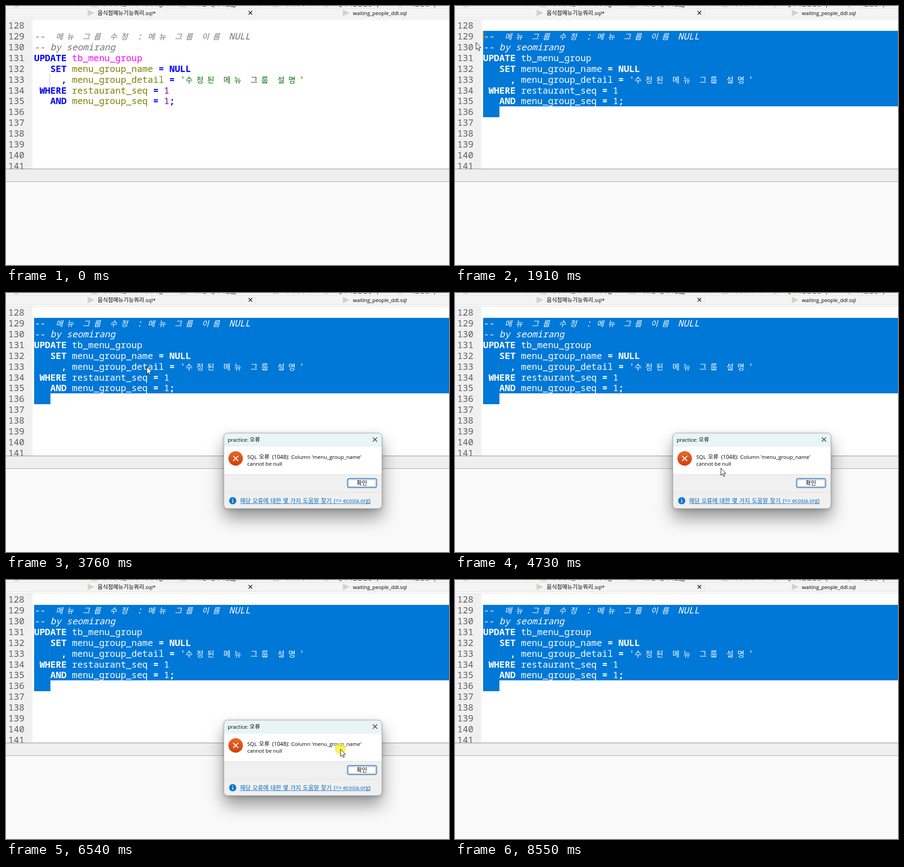
These frames come from a looping animation (977 by 573 pixels, 9.15 s). An HTML page:

```html
<!DOCTYPE html>
<html lang="ko">
<head>
<meta charset="utf-8">
<title>SQL editor</title>
<style>
  html, body { margin: 0; width: 100%; height: 100%; overflow: hidden; background: #fff; }
  svg { position: absolute; left: 0; top: 0; width: 977px; height: 573px; }
  text { font: 11.6px 'Open Sans', 'Noto Sans CJK KR', sans-serif; fill: #000; }
  .ko { font-size: 12.4px; }
  .code text { font: 19.88px 'Noto Sans Mono', 'Noto Sans CJK KR', monospace; }
  .code .hangul { font-size: 17px; }
  .code .note { fill: #747474; font-style: italic; }
  .code .key { fill: #00f; font-weight: bold; }
  .code .op { fill: #00f; font-weight: 600; }
  .code .table { fill: #f0f; }
  .code .name { fill: #808000; }
  .code .num { fill: #800080; }
  .code .str { fill: #006c00; }
  .code .line { fill: #606060; }
  #selection text { fill: #fff; }
  #dialog { transform-origin: 595px 358px; }
  #window { filter: drop-shadow(0 2px 5px rgba(0, 0, 0, .2)) drop-shadow(0 20px 18px rgba(0, 0, 0, .4)); }
  .link { fill: #0067c0; }
</style>
</head>
<body>
<svg>
  <rect width="977" height="573" fill="#fff"/>
  <rect y="30" width="60" height="331" fill="#f8f8f8"/>
  <rect y="30" width="57" height="331" fill="#f0f0f0"/>
  <g class="code" id="numbers"></g>
  <g class="code"></g>
  <path d="M96.5 151V174" stroke="#777" stroke-dasharray="1 1"/>

  <rect width="977" height="30" fill="#f4f4f4"/>
  <path d="M0 5.5H977M158.5 0V5M354.5 0V5M559.5 0V5M673.5 0V5M549.5 6V25M0 25.5H977" stroke="#e2e2e2"/>
  <rect y="26" width="977" height="3" fill="#f9f9f9"/>
  <path d="M0 29.5H977" stroke="#e6e6e6"/>
  <path d="M18 1h10M188 1h14M383 1h15M588 1h14M703 1h6M866 1h6" stroke="#d9d6d1" stroke-width="3"/>
  <text class="ko"><tspan x="210" y="0">대기테이블목록조회쿼리 g</tspan><tspan x="409">메뉴관리_테이블_g</tspan><tspan x="612">예약쿼리</tspan><tspan x="735">_대기인원현황 sp</tspan><tspan x="889">회원현황 sp</tspan></text>
  <path d="M180 8l15 7.3-15 7.3zM743 8l15 7.3-15 7.3z" fill="#d5d1ca"/>
  <text y="19.5"><tspan class="ko" x="202">음식점메뉴기능쿼리</tspan><tspan x="305">.sql*</tspan></text>
  <text x="765" y="19.5" style="font-size:11.3px">waiting_people_ddl.sql</text>
  <path d="M535 11l8 8M543 11l-8 8" stroke="#111" stroke-width="1.5"/>

  <rect y="360" width="977" height="29" fill="#efefef"/>
  <rect y="389" width="977" height="184" fill="#f9f9f9"/>
  <path d="M0 360.5H977" stroke="#858585"/>
  <path d="M0 388.5H977" stroke="#a5a5a5"/>
</svg>

<svg id="selection">
  <rect width="977" height="573" fill="#0078d7"/>
  <path d="M96.5 151V174" stroke="#3c78b4"/>
  <g class="code"></g>
</svg>

<svg>
  <rect id="caret" x="61" y="55" width="2" height="22" fill="#f0a030"/>
  <g id="dialog">
    <rect id="window" x="480.5" y="310" width="348.5" height="167" rx="8" fill="#f0f0f0"/>
    <path d="M480.5 340V318a8 8 0 0 1 8-8H821a8 8 0 0 1 8 8V340z" fill="#e9f4f6"/>
    <rect x="480.5" y="340" width="348.5" height="61" fill="#fff"/>
    <path d="M481 401.5H829M481 441.5H829" stroke="#dedede"/>
    <rect x="480.5" y="310" width="348.5" height="167" rx="8" fill="none" stroke="#8d9496" stroke-width=".8"/>
    <text y="329"><tspan x="489">practice:</tspan><tspan class="ko" x="537.5">오류</tspan></text>
    <path d="M809 319.5l9.5 9.5M818.5 319.5l-9.5 9.5" stroke="#222" stroke-width="1.2"/>
    <linearGradient id="red" x2="0" y2="1"><stop stop-color="#e8682a"/><stop offset="1" stop-color="#cf3f0c"/></linearGradient>
    <circle cx="506.5" cy="366" r="16" fill="url(#red)"/>
    <path d="M501.5 361l10 10M511.5 361l-10 10" stroke="#fff" stroke-width="2" stroke-linecap="round"/>
    <text y="367"><tspan x="532">SQL</tspan><tspan class="ko" x="558">오류</tspan><tspan x="587" style="font-size:12px">(1048):</tspan><tspan x="629">Column 'menu_group_name'</tspan></text>
    <text x="532" y="382">cannot be null</text>
    <rect x="753" y="410.5" width="64.5" height="20" rx="3.5" fill="#fdfdfd" stroke="#0067c0" stroke-width="1.4"/>
    <rect x="755.5" y="413" width="59.5" height="15" fill="none" stroke="#333" stroke-dasharray="1 1" stroke-width=".9"/>
    <text class="ko" x="785" y="424.5" text-anchor="middle">확인</text>
    <circle cx="500" cy="459.5" r="8" fill="#0f78d0"/>
    <path d="M500 458v6M500 454.5v1.8" stroke="#fff" stroke-width="1.7"/>
    <text class="link" y="463.5"><tspan x="516" style="font-size:12.8px;word-spacing:.9px">해당 오류에 대한 몇 가지 도움말 찾기</tspan><tspan x="723" style="font-size:12px">(=&gt; ecosia.org)</tspan></text>
    <path d="M516 466H804" stroke="#0067c0" stroke-width=".9"/>
  </g>
  <g id="cursor">
    <circle id="halo" r="12" fill="#f9ee30" fill-opacity=".78"/>
    <path id="arrow" d="M.5 .5V16.5L4 13.2 6.6 19 9 18 6.5 12.2H11.5z" fill="#fff" stroke="#111"/>
    <path id="beam" d="M-4 -8H-1L0 -7 1 -8H4M0 -7V7M-4 8H-1L0 7 1 8H4" fill="none" stroke="#222" stroke-width="1.2"/>
  </g>
</svg>

<script>
const LOOP = 9150, LEFT = 62, CELL = 11.93, TOP = 54.6, ROW = 23.87, FIRST = 129;
const $ = id => document.getElementById(id);
const clamp = (v, low, high) => Math.min(high, Math.max(low, v));
const ramp = (t, start, end) => clamp((t - start) / (end - start), 0, 1);
const easeOut = p => Math.sin(p * Math.PI / 2);
const within = (t, spans) => spans.some(([start, end]) => t >= start && t < end);

const sql = `--  메뉴 그룹 수정 : 메뉴 그룹 이름 NULL
-- by seomirang
UPDATE tb_menu_group
   SET menu_group_name = NULL
     , menu_group_detail = '수정된 메뉴 그룹 설명'
 WHERE restaurant_seq = 1
   AND menu_group_seq = 1;
   `.split('\n');
const token = /(?<note>--.*)|(?<str>'.*')|(?<key>[A-Z]+)|(?<table>tb_\w+)|(?<name>[a-z]\w*)|(?<num>\d+)|(?<op>[=,;])/g;

// Hangul takes two cells, everything else one.
const cells = str => [...str].reduce((sum, ch) => sum + (/[가-힣]/.test(ch) ? 2 : 1), 0);
const label = (cls, x, row, str) =>
  `<text class="${cls}" x="${x}" y="${TOP + 19.6 + row * ROW}">${str}</text>`;

function renderLine(line, row) {
  let out = '';
  for (const m of line.matchAll(token)) {
    const kind = Object.keys(m.groups).find(key => m.groups[key]);
    for (const run of m[0].matchAll(/[가-힣]+|[^가-힣\s]+/g)) {
      const start = m.index + run.index;
      const xs = [...run[0]].map((_, i) => LEFT + CELL * cells(line.slice(0, start + i)));
      const hangul = /[가-힣]/.test(run[0]) ? ' hangul' : '';
      out += label(kind + hangul, xs.join(' '), row, run[0]);
    }
  }
  return out;
}

const code = sql.map(renderLine).join('');
document.querySelectorAll('.code:not(#numbers)').forEach(g => g.innerHTML = code);
$('numbers').innerHTML = Array.from({ length: 14 },
  (_, i) => label('line', 5, i - 1, FIRST - 1 + i)).join('');

// Hand movements: from a start to an end time, towards a point.
const entry = { x: 940, y: 600 }, press = 680, release = 1570;
const strokes = [
  { from: 60, to: 540, x: 374, y: 206 },
  { from: 600, to: press, x: 374, y: 222 },
  { from: press, to: release, x: 38, y: 73 },
  { from: 1770, to: 1910, x: 46, y: 80 },
  { from: 3570, to: 4270, x: 685, y: 386 },
  { from: 4270, to: 4730, x: 586, y: 387 },
  { from: 5130, to: 5730, x: 733, y: 381 },
  { from: 5800, to: 6270, x: 701, y: 373 },
  { from: 6340, to: 6870, x: 766, y: 375 },
  { from: 7090, to: 7730, x: 785, y: 420 },
  { from: 8020, to: 8500, x: 920, y: 600 },
];

// Sideways motion eases out while the height changes evenly, which bends the path.
const cursorAt = t => strokes.reduce((at, { from, to, x, y }) => {
  const p = ramp(t, from, to);
  return { x: at.x + (x - at.x) * easeOut(p), y: at.y + (y - at.y) * p };
}, entry);

// The selection runs from the end of the last line to the pointer, slightly late.
function selectionAt(t) {
  const at = cursorAt(clamp(t - 80, press, release));
  const last = sql.length - 1;
  const row = clamp(Math.floor((at.y - TOP) / ROW), 0, last);
  const col = clamp(Math.round((at.x - LEFT) / CELL), 0, cells(sql[row]));
  if (t < press || row === last) return 'polygon(0 0, 0 0, 0 0)';
  const x = LEFT + col * CELL, y = TOP + row * ROW;
  const end = LEFT + cells(sql[last]) * CELL, low = TOP + last * ROW;
  const points = [[x, y], [977, y], [977, low], [end, low], [end, low + ROW],
    [LEFT, low + ROW], [LEFT, y + ROW], [x, y + ROW]];
  return `polygon(${points.map(p => p.map(v => Math.round(v) + 'px').join(' ')).join(',')})`;
}

const pressed = [[press, 1840], [4930, 7090], [7880, 8020]];
const caretOn = [[1430, 2170], [2700, 3030], [8160, 8550]];

function render(t) {
  const { x, y } = cursorAt(t);
  const overText = x > 58 && y < 360 && t < release;
  $('cursor').style.transform = `translate(${x}px, ${y}px)`;
  $('beam').style.opacity = +overText;
  $('arrow').style.opacity = +!overText;
  $('halo').style.opacity = +within(t, pressed);
  $('caret').style.opacity = +within(t, caretOn);
  $('selection').style.clipPath = selectionAt(t);

  const opening = ramp(t, 3030, 3370), closing = ramp(t, 8020, 8230);
  $('dialog').style.transform = `scale(${0.9 + 0.1 * (easeOut(opening) - closing)})`;
  $('dialog').style.opacity = Math.min(1, opening * 3) * (1 - closing);
}

let start;
requestAnimationFrame(function tick(now) {
  start ??= now;
  render((now - start) % LOOP);
  requestAnimationFrame(tick);
});
</script>
</body>
</html>
```
